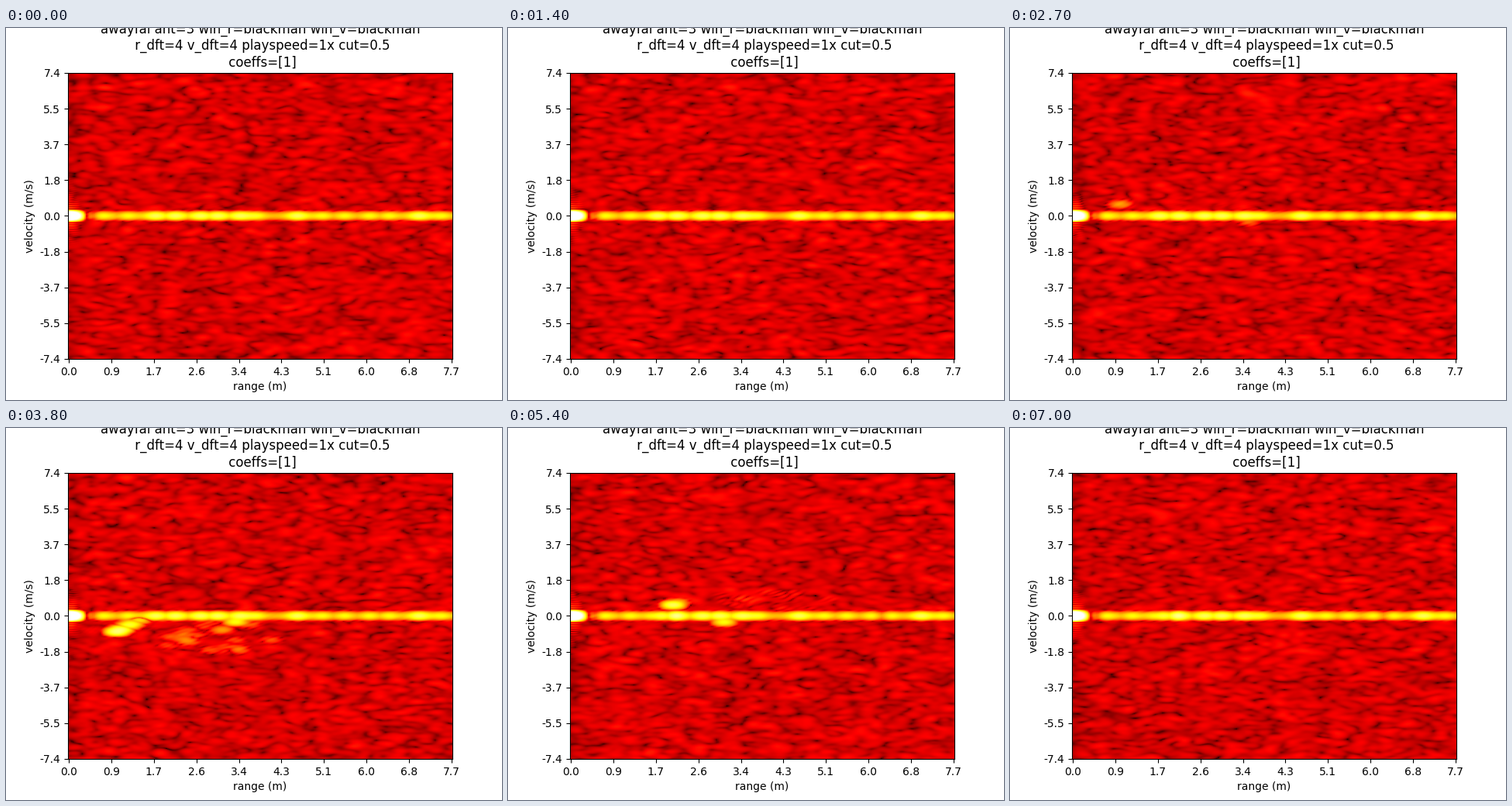
Recreate the animation shown at these times as a matplotlib script. Size 640x480 px, loop 7.1 s.

```python
import numpy as np
import matplotlib.pyplot as plt
from matplotlib.animation import FuncAnimation

FRAMES, STEP = 71, 100
ROWS, COLS, PAD, TAPS, LOOKS = 512, 256, 4, 128, 2
R_MAX, V_MAX = 7.7, 7.39
FLOOR, SLOPE = 0.315, 0.24        # log-magnitude to colour scale

row = np.arange(ROWS)
col = np.arange(COLS)
window = np.blackman(TAPS)
window2d = np.outer(window, window)
noise_rms = np.sqrt(2 * (window2d ** 2).sum())
near_gain = np.clip(0.6 + 0.4 * col / 12, 0, 1)


def amp(level):
    return 10 ** ((level - FLOOR) / SLOPE)


def lobe(d):
    """Blackman window response at d bins from the peak."""
    s = np.sinc
    return (.42 * s(d) + .25 * (s(d - 1) + s(d + 1))
            + .04 * (s(d - 2) + s(d + 2))) / .42


def range_lobe(r):
    return lobe((col - r / R_MAX * (COLS - 1)) / PAD)


def velocity_lobe(v):
    return lobe((row - ROWS / 2 * (1 - v / V_MAX)) / PAD)


def ease(t, start, end):
    u = np.clip((t - start) / (end - start), 0, 1)
    return u * u * (3 - 2 * u)


def bumps(centers, width):
    """Highest of several bell curves along the range axis, in metres."""
    r = col / (COLS - 1) * R_MAX
    d = r[:, None] - np.array(centers)
    return np.exp(-(d / width) ** 2).max(axis=1)


# Still reflectors: a base level, ordinary and bright ones, and a near gap
clutter = (.64 + .11 * bumps([.72, 1.2, 3.8, 5.1, 5.55, 6.05, 6.45, 7.5], .18)
           + .19 * bumps([1.75, 2.15, 2.65, 3.0, 3.45, 4.6, 7.05], .24)
           - .4 * bumps([.3], .16))
settled_shift = .06 * bumps([2.1], .16) - .06 * bumps([1.7, 6.25], .12)
leak = amp(1.2) * range_lobe(0)

scatter = np.random.default_rng(7)
ghosts = scatter.uniform((1, .4, .30), (3.3, 2.2, .44), (22, 3))


def echoes(t):
    """All moving echoes at time t as (range, velocity, level)."""
    if not 2.2 < t < 6.1:
        return []
    r = .92 + 1.13 * ease(t, 3.6, 5.2)
    v = -.15 + .76 * np.cos(2 * np.pi * (t - 2.5) / 3.1)
    level = .2 + .66 * (ease(t, 2.2, 3.2) - ease(t, 5.2, 6.1))
    stride = np.sin(np.pi * np.clip((t - 2.5) / 3.1, 0, 1))
    body = [(r + .11 * k * stride, v + .15 * k * stride, level - .03 * k)
            for k in range(5)]
    paths = [(r + dr, v * k, level - drop - .1 * (1 - stride))
             for dr, k, drop in ghosts]
    return body + paths + [(4 - .17 * t, -.32, level - .1 * stride)]


def spectrum(i):
    rng = np.random.default_rng(500 + i)
    t = i * STEP / 1000
    shape = (LOOKS, TAPS, TAPS)
    raw = rng.normal(size=shape) + 1j * rng.normal(size=shape)
    noise = np.fft.fft(raw * window2d, ROWS, axis=1)
    noise = np.fft.fft(noise, COLS * 2, axis=2)[:, :, :COLS]
    noise *= near_gain / noise_rms
    static = amp(clutter + ease(t, 4.6, 5.4) * settled_shift) + leak
    signal = np.outer(velocity_lobe(0), static).astype(complex)
    for r, v, level in echoes(t):
        phase = np.exp(2j * np.pi * rng.random())
        signal += phase * amp(level) * np.outer(velocity_lobe(v), range_lobe(r))
    power = (np.abs(noise + signal) ** 2).mean(axis=0)
    return FLOOR + SLOPE / 2 * np.log10(power + 1e-9)


fig, ax = plt.subplots(figsize=(6.4, 4.8), dpi=100)
image = ax.imshow(spectrum(0), cmap="hot", vmin=0, vmax=1, aspect="auto")
ax.set_title("awayfal ant=3 win_r=blackman win_v=blackman\n"
             " r_dft=4 v_dft=4 playspeed=1x cut=0.5\n coeffs=[1]")
ax.set_xlabel("range (m)")
ax.set_ylabel("velocity (m/s)")
ax.set_xticks(np.linspace(0, COLS - 1, 10),
              [f"{r:.1f}" for r in np.linspace(0, R_MAX, 10)])
ax.set_yticks(np.linspace(0, ROWS - 1, 9),
              [f"{v:.1f}" for v in np.linspace(V_MAX, -V_MAX, 9)])


def update(i):
    image.set_data(spectrum(i))
    return [image]


anim = FuncAnimation(fig, update, frames=FRAMES, interval=STEP, repeat=True)
plt.show()
```
